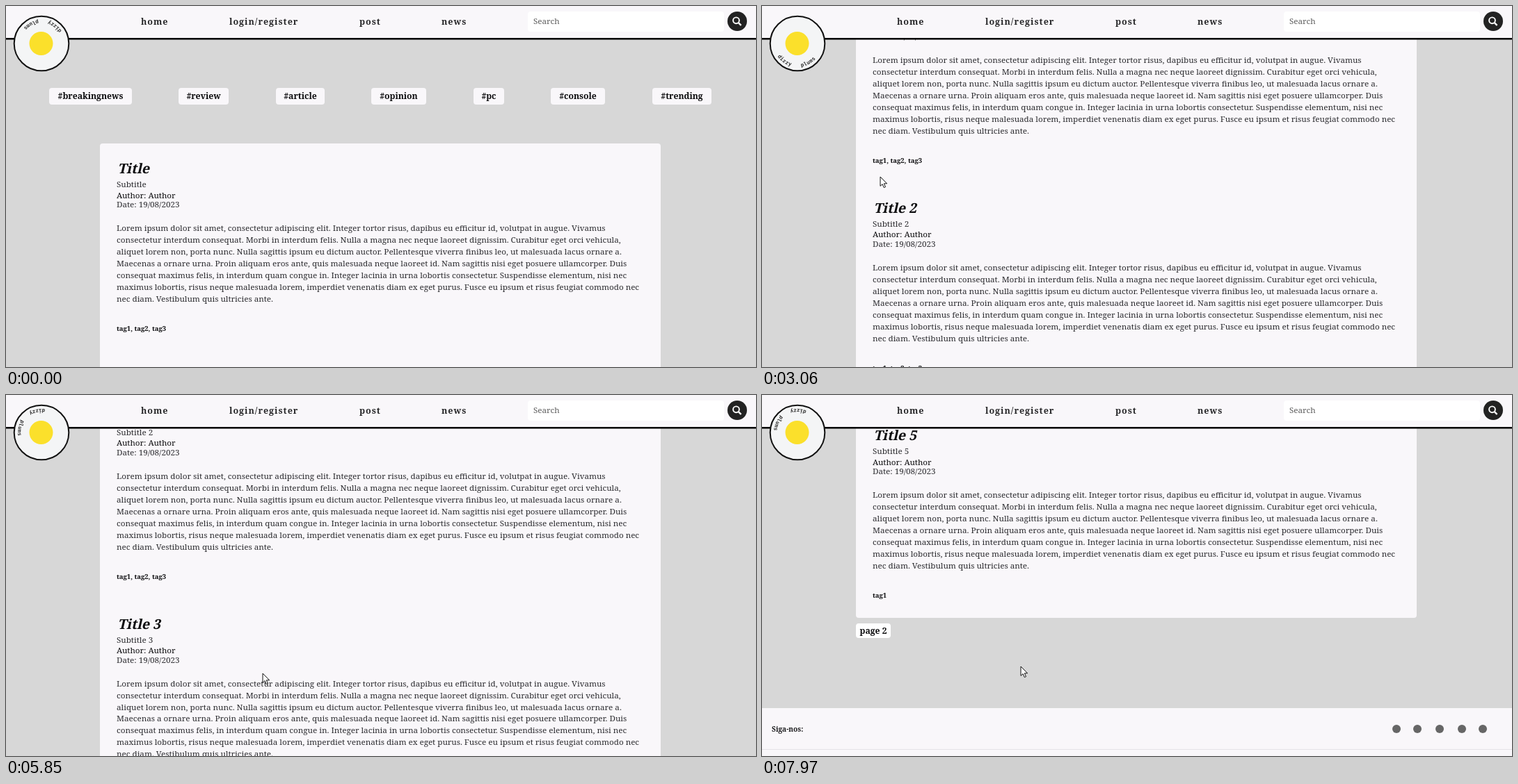
An HTML page that plays this animation: 1078 px wide and 520 px high, repeating every 8 s.

```html
<!DOCTYPE html>
<html lang="en">
<head>
<meta charset="utf-8">
<title>Post list</title>
<style>
  html, body { margin: 0; width: 100%; height: 100%; overflow: hidden; }
  #stage { position: relative; width: 1078px; height: 520px; overflow: hidden; background: #d7d7d7;
    font: 11.65px/20px "Noto Serif", serif; color: #2c2c30; white-space: nowrap; cursor: none; }
  #stage * { box-sizing: border-box; }
  #page, #page > *, header, header > *, #badge, #pointer, #beam { position: absolute; }
  #page { left: 0; top: 0; width: 1078px; height: 2000px; }
  p { margin: 0; left: 159px; width: 758px; height: 20px; }
  .pill { top: 118px; height: 24px; border-radius: 4px; background: #f9f7fa; color: #0c0c0e;
    font-weight: bold; font-size: 12.2px; line-height: 24px; text-align: center; }
  .card { left: 135px; top: 198px; width: 806px; height: 1494px; border-radius: 4px; background: #f9f7fa; }
  .title { height: 30px; line-height: 30px; padding-left: 3px; font-size: 19.5px; font-weight: bold; color: #0c0c0e; }
  .title span { display: inline-block; transform: skewX(-13deg); }
  .author { color: #0c0c0e; }
  .tags { font-size: 9.5px; font-weight: bold; color: #0c0c0e; }
  .next { left: 135px; top: 1700px; width: 50px; height: 21px; line-height: 21px; background: #fff; }
  footer { left: 0; top: 1822px; width: 1078px; height: 178px; background: #f9f7fa; }
  footer > * { position: absolute; }
  footer b { left: 14px; top: 20px; font-size: 10.1px; color: #1c1c1e; }
  footer i { top: 23.5px; width: 12px; height: 12px; border-radius: 50%; background: #666; }
  footer hr { left: 0; top: 59px; width: 1078px; height: 1px; margin: 0; border: 0; background: #e4e3e7; }
  header { left: 0; top: 0; width: 1078px; height: 48px; background: #f9f7fa; border-bottom: 2px solid #000;
    box-shadow: 0 1px rgba(0, 0, 0, .5); }
  header b { top: 13px; font-size: 12.5px; font-weight: 600; letter-spacing: 1px; color: #262628; }
  .search { left: 750px; top: 8px; width: 282px; height: 29px; padding-left: 8px; line-height: 28px;
    border-radius: 4px; background: #fff; color: #5c5c5c; font-weight: 500; }
  header svg { left: 1036px; top: 7px; }
  #badge { left: 10px; top: 13px; }
  #page .hover { color: #1560bd; }
</style>
</head>
<body>
<div id="stage">
  <div id="page"></div>
  <header>
    <b style="left:194px">home</b>
    <b style="left:321px">login/register</b>
    <b style="left:508px">post</b>
    <b style="left:626px">news</b>
    <div class="search">Search</div>
    <svg width="30" height="30" fill="none" stroke="#fff">
      <circle cx="15" cy="15" r="14" fill="#222" stroke="none"/>
      <circle cx="13.5" cy="13.8" r="4.4" stroke-width="1.9"/>
      <path d="M16.8 17.1L20.6 20.9" stroke-width="2.3"/>
    </svg>
  </header>
  <svg id="badge" width="82" height="82" viewBox="-41 -41 82 82">
    <circle r="39.3" fill="#f4f5f6" stroke="#111" stroke-width="2"/>
    <circle cx="-.5" r="17" fill="#fbe02b"/>
    <g id="ring">
      <path id="arc" d="M-34 0A34 34 0 0 0 34 0" fill="none"/>
      <text font-family="DejaVu Sans Mono, monospace" font-size="7.5" font-weight="bold" letter-spacing=".4" fill="#333" text-anchor="middle">
        <textPath href="#arc" startOffset="50%">dizzy&nbsp;&nbsp;&nbsp;plums</textPath>
      </text>
    </g>
  </svg>
  <svg id="pointer" width="14" height="20" viewBox="-1 -1 14 20">
    <path d="M0 0V13.4L3.1 10.6L5.3 15.6L7.5 14.6L5.3 9.8H9.6Z" fill="#fff" stroke="#111" stroke-linejoin="round"/>
  </svg>
  <svg id="beam" width="9" height="15" fill="none" stroke="#111">
    <path d="M1.5 1.5H3.5L4.5 2.5L5.5 1.5H7.5M4.5 2.5V12.5M1.5 13.5H3.5L4.5 12.5L5.5 13.5H7.5"/>
  </svg>
</div>
<script>
const LOOP = 8000, PITCH = 298.8;
const $ = id => document.getElementById(id);

const lorem = [
  'Lorem ipsum dolor sit amet, consectetur adipiscing elit. Integer tortor risus, dapibus eu efficitur id, volutpat in augue. Vivamus',
  'consectetur interdum consequat. Morbi in interdum felis. Nulla a magna nec neque laoreet dignissim. Curabitur eget orci vehicula,',
  'aliquet lorem non, porta nunc. Nulla sagittis ipsum eu dictum auctor. Pellentesque viverra finibus leo, ut malesuada lacus ornare a.',
  'Maecenas a ornare urna. Proin aliquam eros ante, quis malesuada neque laoreet id. Nam sagittis nisi eget posuere ullamcorper. Duis',
  'consequat maximus felis, in interdum quam congue in. Integer lacinia in urna lobortis consectetur. Suspendisse elementum, nisi nec',
  'maximus lobortis, risus neque malesuada lorem, imperdiet venenatis diam ex eget purus. Fusce eu ipsum et risus feugiat commodo nec',
  'nec diam. Vestibulum quis ultricies ante.'
];
const pills = [['breakingnews', 62, 119], ['review', 248, 72], ['article', 388, 70], ['opinion', 525, 79],
  ['pc', 672, 44], ['console', 783, 78], ['trending', 929, 85]];

// time, scroll offset
const scrollKeys = [[0, 0], [1480, 0], [1640, 70], [1850, 167], [2100, 225], [2450, 242], [4990, 242],
  [5050, 253], [5850, 502], [6670, 838], [7470, 1240], [7800, 1371]];
// time, pointer x, pointer y
const pointerKeys = [[70, 600, 455], [450, 560, 250], [600, 700, 135], [810, 960, 140], [1000, 940, 200],
  [1400, 830, 330], [1640, 805, 363], [1850, 801, 363], [2050, 780, 350], [2300, 480, 310], [2500, 210, 288],
  [2700, 200, 285], [2880, 195, 222], [3060, 170, 246], [3430, 172, 260], [3700, 190, 292], [3900, 222, 329],
  [4190, 222, 358], [4700, 300, 425], [5050, 300, 433], [5500, 350, 410], [5850, 369, 401], [6670, 380, 396],
  [7970, 372, 391]];

const hot = text => `<span class="hot">${text}</span>`;
const line = (y, text, cls = '') => `<p class="${cls}" style="top:${y - 10}px">${text}</p>`;

function post(n) {
  const y = n * PITCH, num = n ? ' ' + (n + 1) : '';
  const tags = n < 2 ? ['tag1', 'tag2', 'tag3'] : ['tag1'];
  return line(y + 229, `<span>Title${num}</span>`, 'title hot')
    + line(y + 257, 'Subtitle' + num)
    + line(y + 272.5, 'Author: ' + hot('Author'), 'author')
    + line(y + 286, 'Date: 19/08/2023')
    + lorem.map((text, i) => line(y + 320 + i * 16.95, text)).join('')
    + line(y + 465, tags.map(hot).join(', '), 'tags');
}

$('page').innerHTML =
  pills.map(([name, x, w]) => `<div class="pill hot" style="left:${x}px;width:${w}px">#${name}</div>`).join('')
  + '<div class="card"></div>'
  + [0, 1, 2, 3, 4].map(post).join('')
  + '<div class="pill next">page 2</div>'
  + '<footer><b>Siga-nos:</b>'
  + [912, 942, 974, 1006, 1036].map(x => `<i style="left:${x - 6}px"></i>`).join('')
  + '<hr></footer>';

const hotspots = [...document.querySelectorAll('.hot')];

function sample(keys, t) {
  const i = keys.findIndex(k => k[0] > t);
  if (i < 0) return keys[keys.length - 1].slice(1);
  if (i === 0) return keys[0].slice(1);
  const a = keys[i - 1], b = keys[i], f = (t - a[0]) / (b[0] - a[0]);
  return a.slice(1).map((v, j) => v + (b[j + 1] - v) * f);
}

function place(el, x, y, shown) {
  el.style.transform = `translate(${x}px,${y}px)`;
  el.style.visibility = shown ? 'visible' : 'hidden';
}

function draw(t) {
  const [scroll] = sample(scrollKeys, t);
  const [x, y] = sample(pointerKeys, t).map(Math.round);
  const shown = t >= 70, overText = t > 4350 && t < 5200;
  $('page').style.transform = `translateY(${-Math.round(scroll)}px)`;
  $('ring').setAttribute('transform', `rotate(${184 + t * .1762})`);
  place($('pointer'), x - 1, y - 1, shown && !overText);
  place($('beam'), x - 4, y - 7, overText);

  const origin = $('stage').getBoundingClientRect();
  const px = x + origin.left, py = y + origin.top;
  const over = hotspots.map(el => {
    const r = el.getBoundingClientRect();
    return shown && px >= r.left && px <= r.right && py >= r.top && py <= r.bottom;
  });
  hotspots.forEach((el, i) => el.classList.toggle('hover', over[i]));
}

$('pointer').style.left = $('pointer').style.top = $('beam').style.left = $('beam').style.top = 0;
const start = performance.now();
function tick() {
  draw((performance.now() - start) % LOOP);
  requestAnimationFrame(tick);
}
tick();
</script>
</body>
</html>
```
